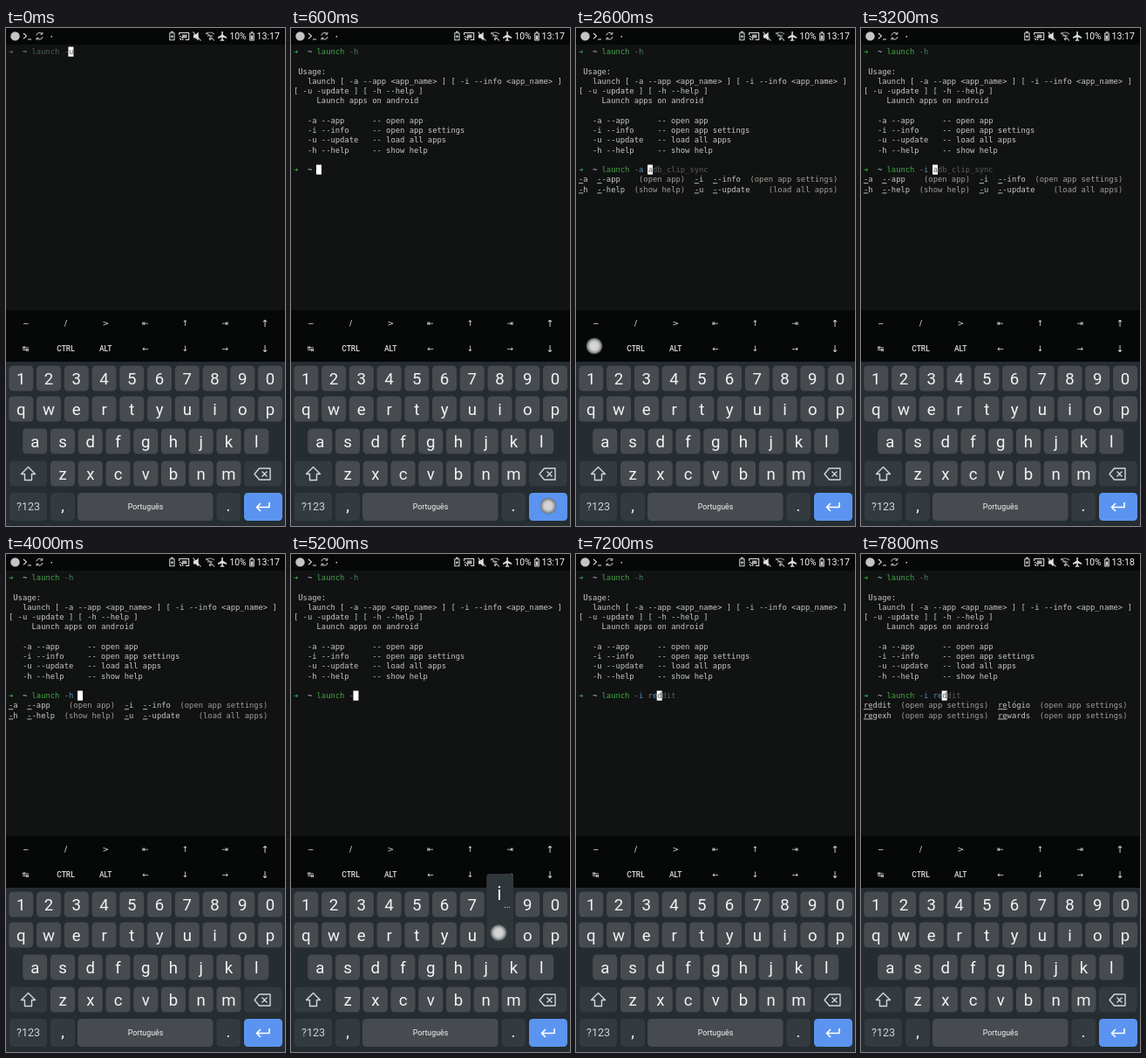
Animation, 320 px wide and 570 px high, one loop 8 s. Source, as an HTML page with a canvas:

```html
<!DOCTYPE html>
<html lang="en">
<head>
<meta charset="utf-8">
<title>Terminal launcher</title>
<style>
  html, body { margin: 0; width: 100%; height: 100%; overflow: hidden; background: #000; }
  canvas { display: block; width: 320px; height: 570px; }
</style>
</head>
<body>
<canvas id="stage"></canvas>
<script>
const LOOP = 8000;
const canvas = document.getElementById('stage');
const ctx = canvas.getContext('2d');
const scale = window.devicePixelRatio || 1;
canvas.width = 320 * scale;
canvas.height = 570 * scale;

const MONO = '8.82px "DejaVu Sans Mono", monospace';
const SANS = 'Roboto, sans-serif';
const COL = 5.31, ROW = 11.25;
const ARROW = '#35ad50', GREEN = '#42a647', BLUE = '#5590b4';
const TEXT = '#c6c8c6', DIM = '#a0a098', HINT = '#5a5c5b', TILDE = '#c0cccc';
const ICON = '#dfe1e1';

// Each step: start time, typed text, then optional hint, menu, pressed key and popup.
const steps = [
  { at: 0, cmd: 'launch -', hint: 'u', faded: true },
  { at: 200, cmd: 'launch -', hint: 'u', touch: 'h', popup: true },
  { at: 400, cmd: 'launch -h' },
  { at: 600, cmd: '', touch: 'enter' },
  { at: 1000, cmd: 'l', hint: 'aunch -h', touch: 'l', popup: true },
  { at: 1200, cmd: 'launch', hint: ' -h' },
  { at: 1400, cmd: 'launch ', hint: '-h', touch: 'space' },
  { at: 1600, cmd: 'launch ', hint: '-h' },
  { at: 1800, cmd: 'launch -', hint: 'h', touch: 'dash' },
  { at: 2000, cmd: 'launch -', hint: 'h' },
  { at: 2200, cmd: 'launch -', menu: 'flags', touch: 'tab' },
  { at: 2600, cmd: 'launch -a ', hint: 'adb_clip_sync', menu: 'flags', touch: 'tab' },
  { at: 2800, cmd: 'launch -a ', hint: 'adb_clip_sync', menu: 'flags' },
  { at: 3000, cmd: 'launch -i ', hint: 'adb_clip_sync', menu: 'flags', touch: 'tab' },
  { at: 3200, cmd: 'launch -i ', hint: 'adb_clip_sync', menu: 'flags' },
  { at: 3400, cmd: 'launch -h ', menu: 'flags', touch: 'tab' },
  { at: 3800, cmd: 'launch -h ', menu: 'flags' },
  { at: 4400, cmd: 'launch -h', menu: 'flags', touch: 'backspace' },
  { at: 4600, cmd: 'launch -h' },
  { at: 4800, cmd: 'launch -', touch: 'backspace' },
  { at: 5000, cmd: 'launch -' },
  { at: 5200, cmd: 'launch -', touch: 'i', popup: true },
  { at: 5400, cmd: 'launch -i' },
  { at: 5600, cmd: 'launch -i ', hint: 'adb_clip_sync', touch: 'space' },
  { at: 6000, cmd: 'launch -i ', hint: 'adb_clip_sync' },
  { at: 6600, cmd: 'launch -i ', hint: 'adb_clip_sync', touch: 'r', popup: true },
  { at: 6800, cmd: 'launch -i r', hint: 'eddit' },
  { at: 7000, cmd: 'launch -i r', hint: 'eddit', touch: 'e', popup: true },
  { at: 7200, cmd: 'launch -i re', hint: 'ddit' },
  { at: 7400, cmd: 'launch -i re', hint: 'ddit', menu: 'apps', touch: 'tab' },
  { at: 7600, cmd: 'launch -i re', hint: 'ddit', menu: 'apps' }
];

const usage = [
  [2, 1, 'Usage:'],
  [3, 3, 'launch [ -a --app <app_name> ] [ -i --info <app_name> ]'],
  [4, 0, '[ -u -update ] [ -h --help ]'],
  [5, 5, 'Launch apps on android'],
  [7, 3, '-a --app      -- open app'],
  [8, 3, '-i --info     -- open app settings'],
  [9, 3, '-u --update   -- load all apps'],
  [10, 3, '-h --help     -- show help']
];

// Menu entries: row, column, text, underlined prefix length.
const settings = '(open app settings)';
const menus = {
  flags: [
    [13, 0, '-a', 1], [13, 4, '--app', 1], [13, 13, '(open app)'],
    [13, 25, '-i', 1], [13, 29, '--info', 1], [13, 37, settings],
    [14, 0, '-h', 1], [14, 4, '--help', 1], [14, 12, '(show help)'],
    [14, 25, '-u', 1], [14, 29, '--update', 1], [14, 41, '(load all apps)']
  ],
  apps: [
    [13, 0, 'reddit', 2], [13, 8, settings], [13, 29, 'relógio', 2], [13, 38, settings],
    [14, 0, 'regexh', 2], [14, 8, settings], [14, 29, 'rewards', 2], [14, 38, settings]
  ]
};

// Keyboard keys by centre, and the places where fingers land.
const keys = [];
const spots = { dash: [22, 337], tab: [21, 364], space: [209, 546], enter: [295, 547], backspace: [295, 510] };
function addRow(chars, x, y) {
  [...chars].forEach((label, i) => {
    const cx = x + i * 31.75;
    keys.push({ label, x: cx, y });
    spots[label] = [cx - 1.5, y - 2.5];
  });
}
addRow('1234567890', 17.3, 401);
addRow('qwertyuiop', 17.3, 436);
addRow('asdfghjkl', 33.2, 473);
addRow('zxcvbnm', 65, 510);

function box(x, y, w, h, r, fill) {
  ctx.fillStyle = fill;
  ctx.beginPath();
  ctx.roundRect(x, y, w, h, r);
  ctx.fill();
}

function label(text, x, y, font, color = '#f1f3f4', align = 'center') {
  ctx.font = font;
  ctx.fillStyle = color;
  ctx.textAlign = align;
  ctx.fillText(text, x, y);
}

function stroke(path, color = ICON, width = 1.1) {
  ctx.strokeStyle = color;
  ctx.lineWidth = width;
  ctx.stroke(new Path2D(path));
}

function shape(path, color = ICON) {
  ctx.fillStyle = color;
  ctx.fill(new Path2D(path));
}

const colX = col => 3 + col * COL;
const rowY = row => 27 + row * ROW;

function mono(row, col, text, color = TEXT) {
  label(text, colX(col), rowY(row) + 3.1, MONO, color, 'left');
}

function drawStatus(time) {
  box(0, 0, 320, 19, 0, '#060707');
  shape('M10.5 4.2a5.2 5.2 0 1 1 0 10.4a5.2 5.2 0 1 1 0-10.4', '#c4c4c4');
  stroke('M20 6l3.5 3.2-3.5 3.2M25 13h4');
  stroke('M34.8 8.5a3.8 3.8 0 0 1 6.8-1.6M42 10a3.8 3.8 0 0 1-6.8 1.6M41.8 4.8v2.4h-2.4M35 13.8v-2.4h2.4', '#ccc', 1);
  box(51.5, 9, 1.5, 1.5, 0, '#ccc');

  stroke('M187.8 5.8h5.2v8h-5.2zM189 4.4h2.8M188.8 9.8h3.2M190.4 8.2v3.2', '#d0d2d2');
  stroke('M198.7 8V5.5h11v8h-4M198.7 9.5a4.5 4.5 0 0 1 4.2 4.5M198.7 12a2 2 0 0 1 2 2');
  box(202, 7.5, 5.5, 4, 0, '#aaa');
  shape('M215 7.5h2.5l3.2-3v10l-3.2-3H215z');
  stroke('M214.5 4.5l9 10');
  stroke('M229 7q5-4 10 0M231 9.5q3-2.4 6 0M229.5 5l9.5 9.5', '#9a9c9c');
  shape('M234 11l2 1.2-2 2.3-1.5-2.3z', '#b5b7b7');
  shape('M247.3 4h1.5v3.8l4.4 2.8v1.3l-4.4-1.4v2.6l1.4 1v.9l-2.1-.5-2.2.5v-.9l1.4-1v-2.6l-4.3 1.4v-1.3l4.3-2.8z');
  label('10%', 266, 13.2, '10.3px ' + SANS);
  stroke('M279.8 6h4.4v8h-4.4zM280.8 4.8h2.4');
  box(280.8, 8.5, 2.4, 4.5, 0, '#ccc');
  label(time >= 7600 ? '13:18' : '13:17', 300.8, 13.4, '10.6px ' + SANS);
}

function drawPrompt(row, { cmd, hint = '', faded }) {
  mono(row, 0, '➜', faded ? '#5c7166' : ARROW);
  mono(row, 3, '~', faded ? '#a0a8a8' : TILDE);
  mono(row, 5, cmd.slice(0, 6), faded ? '#4a5f5c' : GREEN);
  mono(row, 11, cmd.slice(6), faded ? '#4a5f5c' : BLUE);
  const cursor = 5 + cmd.length;
  mono(row, cursor + 1, hint.slice(1), HINT);
  box(colX(cursor) - 0.6, rowY(row) - 5.5, COL + 0.7, 11.2, 0, '#fff');
  mono(row, cursor, hint.slice(0, 1), '#555');
}

function drawTerminal(step) {
  box(0, 19, 320, 304, 0, '#111212');
  if (step.at < 600) return drawPrompt(0, step);

  mono(0, 0, '➜', ARROW);
  mono(0, 3, '~', TILDE);
  mono(0, 5, 'launch', GREEN);
  mono(0, 12, '-h', '#477f72');
  for (const line of usage) mono(...line);
  drawPrompt(12, step);

  for (const [row, col, text, underlined = 0] of menus[step.menu] || []) {
    mono(row, col, text, underlined ? TEXT : DIM);
    if (underlined) box(colX(col), rowY(row) + 4, underlined * COL, 0.9, 0, TEXT);
  }
}

function drawExtraKeys() {
  box(0, 323, 320, 59, 0, '#060707');
  const rows = ['− / > ⇤ ↑ ⇥ ↑', '↹ CTRL ALT ← ↓ → ↓'];
  rows.forEach((row, r) => row.split(' ').forEach((text, i) => {
    const last = i === 6;
    const font = /[A-Z]/.test(text) ? '500 8.5px ' + SANS
      : `${last ? 11 : 9}px "DejaVu Sans", sans-serif`;
    label(text, 22.8 + i * 45.7, (r ? 370.3 : 341.3) + (last ? 0.5 : 0), font, '#dfe1e1');
  }));
}

function drawKeyboard() {
  const key = '#474b4f', side = '#333b40';
  box(0, 382, 320, 188, 0, '#252d32');
  for (const { label: text, x, y } of keys) {
    box(x - 14, y - 14.6, 28, 29.2, 4.5, key);
    label(text, x, y + 6.6, '18.6px ' + SANS);
  }

  box(4, 495.4, 43, 29.2, 4.5, side);
  box(273, 495.4, 43.5, 29.2, 4.5, side);
  stroke('M25.5 502.5l8 8h-4v7h-8v-7h-4z', '#d4d8da', 1.4);
  stroke('M285 510.5l5.5-6.5h12.5v13h-12.5zM293.5 507.5l6 6M299.5 507.5l-6 6', '#d4d8da', 1.4);

  box(4, 532, 43, 32, 4.5, side);
  box(51, 532, 28, 32, 4.5, side);
  box(82, 532, 155.5, 32, 4.5, key);
  box(241.5, 532, 27.5, 32, 4.5, side);
  box(273, 532, 44, 32, 4.5, '#5b94f0');
  label('?123', 25.5, 552, '12.5px ' + SANS, '#d0d4d6');
  label(',', 65, 553, '18.6px ' + SANS);
  label('.', 255, 553, '18.6px ' + SANS);
  label('Português', 160, 551, '8.8px ' + SANS);
  stroke('M302 543v5.5h-14M292 544l-4.5 4.5 4.5 4.5', '#fff', 1.6);
}

function drawTouch({ touch, popup }) {
  if (!touch) return;
  if (popup) {
    const { x, y } = keys.find(k => k.label === touch);
    box(x - 15.4, y - 70, 31, 84.5, 4, '#30373b');
    label(touch, x - 0.6, y - 40, '22px ' + SANS);
    label('...', x + 8.5, y - 31.5, '10px ' + SANS, '#dcdfe0');
  }
  const [x, y] = spots[touch];
  const faint = touch === 'space';
  const radius = 9.6;
  const glow = ctx.createRadialGradient(x, y, 0, x, y, radius);
  glow.addColorStop(0, faint ? '#767879' : '#dadada');
  glow.addColorStop(0.5, faint ? '#747677' : '#cfcfcf');
  glow.addColorStop(0.8, faint ? '#6c6e70' : '#8f9294');
  glow.addColorStop(1, 'rgba(95,98,100,.5)');
  ctx.fillStyle = glow;
  ctx.beginPath();
  ctx.arc(x, y, radius, 0, Math.PI * 2);
  ctx.fill();
}

function draw(now) {
  const time = now % LOOP;
  const step = steps.findLast(s => s.at <= time);
  ctx.setTransform(scale, 0, 0, scale, 0, 0);
  ctx.lineJoin = 'round';
  drawStatus(time);
  drawTerminal(step);
  drawExtraKeys();
  drawKeyboard();
  drawTouch(step);
}

const start = performance.now();
function tick() {
  draw(performance.now() - start);
  requestAnimationFrame(tick);
}
tick();
</script>
</body>
</html>
```
